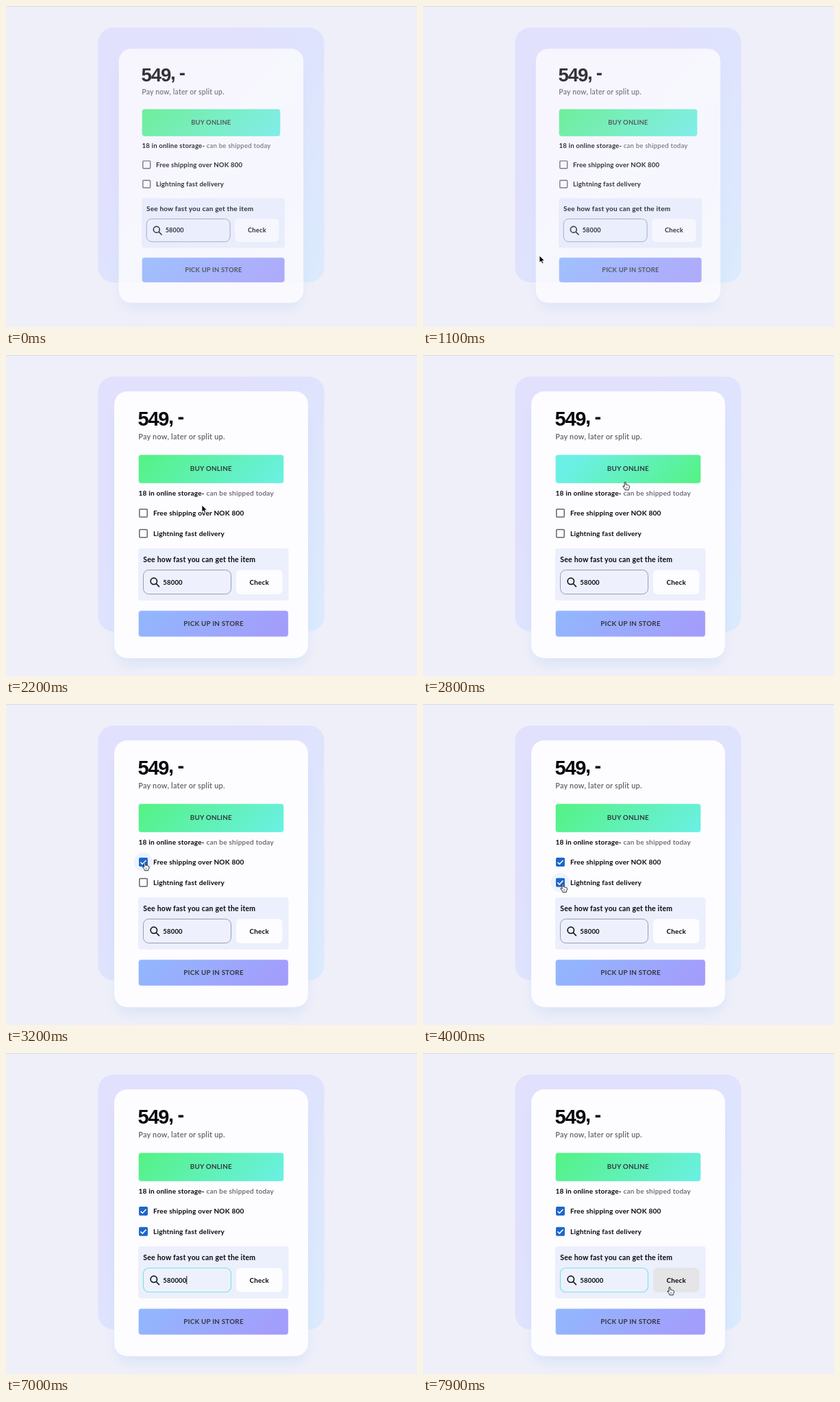
Recreate the animation shown at these times as an HTML page. Size 600 by 468 pixels, loop 8 s.

```html
<!DOCTYPE html>
<html lang="en">
<head>
<meta charset="utf-8">
<title>Product card</title>
<style>
html, body { margin: 0; width: 100%; height: 100%; overflow: hidden; background: #efeff9; }
svg { display: block; width: 600px; height: 468px; }
text { font: 700 10.1px Lato, "Open Sans", sans-serif; letter-spacing: .02em; fill: #08080c; }
.price { font: 700 29px "Liberation Sans", Arial, sans-serif; letter-spacing: -1.2px; }
.soft { font-weight: 600; fill: #5f5f69; }
.mid { text-anchor: middle; }
.label { font-size: 9.9px; fill: #33383f; }
.edge { stroke: #fff; stroke-opacity: .25; }
</style>
</head>
<body>
<svg viewBox="0 0 600 468" xmlns="http://www.w3.org/2000/svg">
  <defs>
    <linearGradient id="back" x1="0" y1="0" x2="1" y2="1">
      <stop offset="0.3" stop-color="#e1e0fd"/><stop offset="0.95" stop-color="#dbeafd"/>
    </linearGradient>
    <linearGradient id="buyFill" gradientUnits="userSpaceOnUse" x1="235.6" y1="102.4" x2="363.4" y2="230.1">
      <stop id="buyA" offset="0"/><stop id="buyB" offset="1"/>
    </linearGradient>
    <linearGradient id="storeFill" gradientUnits="userSpaceOnUse" x1="238.2" y1="327.2" x2="367.2" y2="456.2">
      <stop offset="0" stop-color="#91b8fe"/><stop offset="1" stop-color="#a59afb"/>
    </linearGradient>
    <filter id="blur" x="-20%" y="-20%" width="140%" height="140%"><feGaussianBlur stdDeviation="9"/></filter>
  </defs>

  <rect width="600" height="468" fill="#efeff9"/>
  <rect width="600" height="1" fill="#dadbe3"/>
  <rect x="134.5" y="31.5" width="330" height="371.5" rx="22" fill="url(#back)"/>

  <g id="card">
    <rect x="160" y="78" width="279" height="374" rx="20" fill="#bcd6f5" opacity=".4" filter="url(#blur)"/>
    <rect x="158" y="53" width="283" height="389" rx="19" fill="#fdfcff"/>

    <text class="price" y="103"><tspan x="192.5">549</tspan><tspan x="237" dy="-3.5">,</tspan><tspan x="250.5">-</tspan></text>
    <text class="soft" x="193.3" y="122.6" style="font-size:10.9px">Pay now, later or split up.</text>

    <rect class="edge" x="193.5" y="145.5" width="212" height="41.5" rx="4" fill="url(#buyFill)"/>
    <text class="mid label" x="299.3" y="169.4">BUY ONLINE</text>
    <text x="193.4" y="205.3">18 in online storage- <tspan class="soft">can be shipped today</tspan></text>

    <g id="boxes"></g>
    <text x="215" y="234.2">Free shipping over NOK 800</text>
    <text x="215" y="263.8">Lightning fast delivery</text>

    <rect x="193" y="282" width="219.5" height="75.8" rx="4" fill="#eceffc"/>
    <text x="200.3" y="302" style="font-size:10.5px">See how fast you can get the item</text>
    <rect id="field" x="200.5" y="313.5" width="128" height="35" rx="8" fill="#eef1fd"/>
    <g fill="none" stroke="#16161c" stroke-width="1.7" stroke-linecap="round">
      <circle cx="215.8" cy="329.8" r="4.7"/><path d="M219.4 333.5 223.4 337.6"/>
    </g>
    <text id="code" x="229.3" y="334.5" style="font-size:9.5px"></text>
    <rect id="caret" y="325" width="1" height="12" fill="#111"/>
    <rect id="check" x="336" y="313.3" width="67.5" height="35.4" rx="6"/>
    <text class="mid" x="369.8" y="334.5" style="font-size:9.9px">Check</text>

    <rect class="edge" x="193.5" y="372.8" width="218.6" height="37.9" rx="4" fill="url(#storeFill)"/>
    <text class="mid label" x="303" y="395">PICK UP IN STORE</text>
  </g>

  <g id="arrow"><path d="M0 0V10.2L2.4 8 4 11.6 5.8 10.8 4.2 7.3H7.4Z" fill="#000" stroke="#fff" stroke-width=".8"/></g>
  <g id="hand"><path d="M-.4 1Q.6-.8 1.6 1V4.2Q2.8 3.5 3.4 4.6 4.6 4 5.1 5.1 6.6 4.8 6.8 6.2V8Q6.6 9.6 5.8 10.4V11.8H.4V10.6L-2.4 7.2Q-3 5.8-1.6 5.8L-.4 7Z" fill="#fff" stroke="#111" stroke-width=".9" stroke-linejoin="round"/><path d="M2 7.6V9.8M3.6 7.6V9.8" stroke="#111" stroke-width=".5"/></g>
  <g id="beam"><path d="M-2.4-5Q-.4-5 0-4 .4-5 2.4-5M0-4V4M-2.4 5Q-.4 5 0 4 .4 5 2.4 5" fill="none" stroke="#222" stroke-width="1"/></g>
</svg>
<script>
const LOOP = 8000, STEP = 100;
const FOCUS_AT = 5500, TYPE_AT = 7000, BLINK = 500;
const GREEN = '#54f282', CYAN = '#6bf0e6';
const $ = id => document.getElementById(id);
const set = (el, attrs) => { for (const k in attrs) el.setAttribute(k, attrs[k]); };
const show = (el, on) => set(el, { visibility: on ? 'visible' : 'hidden' });

// time, x, y of the pointer
const PATH = [
  [800, 32, 400], [1100, 170, 364], [1400, 217.5, 350.5], [1600, 221, 351], [1700, 221, 351],
  [2400, 312, 166], [2600, 312, 166], [2800, 294.5, 185], [3100, 202, 231], [3500, 202, 231],
  [3800, 203.5, 262.5], [4400, 203.5, 262.5], [5000, 270.5, 326], [5300, 270.5, 326],
  [5700, 262, 328], [7200, 262, 328], [7700, 334, 338], [7900, 359.5, 341]
];
const BOX_X = 200.5;
const boxes = [{ y: 230.5, at: 3200 }, { y: 260.2, at: 3900 }];
const cursors = ['arrow', 'hand', 'beam'];

for (const b of boxes) {
  const g = document.createElementNS('http://www.w3.org/2000/svg', 'g');
  set(g, { transform: `translate(${BOX_X} ${b.y})` });
  g.innerHTML = '<circle r="13.8" fill="#edf3fe"/>' +
    '<rect x="-5.7" y="-5.7" width="11.4" height="11.4" rx="1" stroke-width="1.5"/>' +
    '<path d="M-4 .2-1.3 2.9 4-2.6" fill="none" stroke="#fff" stroke-width="1.5"/>';
  $('boxes').append(g);
  [b.halo, b.frame, b.tick] = g.children;
}

function pointer(t) {
  const i = PATH.findIndex(p => p[0] > t);
  if (i < 0) return PATH[PATH.length - 1].slice(1);
  if (i === 0) return [-99, -99];
  const [t0, x0, y0] = PATH[i - 1], [t1, x1, y1] = PATH[i];
  const u = (t - t0) / (t1 - t0);
  return [x0 + (x1 - x0) * u, y0 + (y1 - y0) * u];
}

function draw(t) {
  const [x, y] = pointer(t);
  const over = (l, top, r, b) => x >= l && x <= r && y >= top && y <= b;

  // card grows and turns opaque as the pointer enters
  const u = Math.min(1, Math.max(0, (t - 1100) / 400));
  const grow = 1 - (1 - u) ** 2.2;
  const scale = (1 + 0.05 * grow) / 1.05;
  set($('card'), {
    transform: `translate(299.4 247.5) scale(${scale}) translate(-299.4 -247.5)`,
    opacity: 0.8 + 0.2 * grow
  });

  const onBuy = over(193, 145, 406, 187.5);
  set($('buyA'), { 'stop-color': onBuy ? CYAN : GREEN, offset: onBuy ? 0.15 : 0 });
  set($('buyB'), { 'stop-color': onBuy ? GREEN : CYAN });

  let onBox = false;
  for (const b of boxes) {
    const hover = Math.hypot(x - BOX_X, y - b.y) < 14;
    const done = t >= b.at;
    onBox = onBox || hover;
    show(b.halo, hover);
    show(b.tick, done);
    set(b.frame, { fill: done ? '#1d67ca' : 'none', stroke: done ? '#1d67ca' : '#64646c' });
  }

  const onField = over(200.5, 313.5, 329, 348.5);
  const lit = onField || t >= 5000;
  set($('field'), { stroke: lit ? '#70e8dc' : '#979cae', 'stroke-width': lit ? 1.1 : 1 });

  // typing restarts the caret's blink
  const typed = t >= TYPE_AT;
  const since = t - (typed ? TYPE_AT : FOCUS_AT);
  $('code').textContent = typed ? '580000' : '58000';
  set($('caret'), { x: typed ? 263.3 : 257.8 });
  show($('caret'), since >= 0 && since % (2 * BLINK) < BLINK);

  const onCheck = over(336, 313, 403.5, 349);
  set($('check'), { fill: onCheck ? '#e5e5e7' : '#fdfcff' });

  const onStore = over(193, 372, 412.6, 411);
  const kind = onField ? 'beam' : onBuy || onBox || onCheck || onStore ? 'hand' : 'arrow';
  const hidden = typed && t < TYPE_AT + 200;
  for (const id of cursors) {
    set($(id), { transform: `translate(${x} ${y})` });
    show($(id), id === kind && !hidden);
  }
}

const start = performance.now();
function frame() {
  const t = Math.max(0, performance.now() - start) % LOOP;
  draw(Math.floor(t / STEP) * STEP);
  requestAnimationFrame(frame);
}
frame();
</script>
</body>
</html>
```
